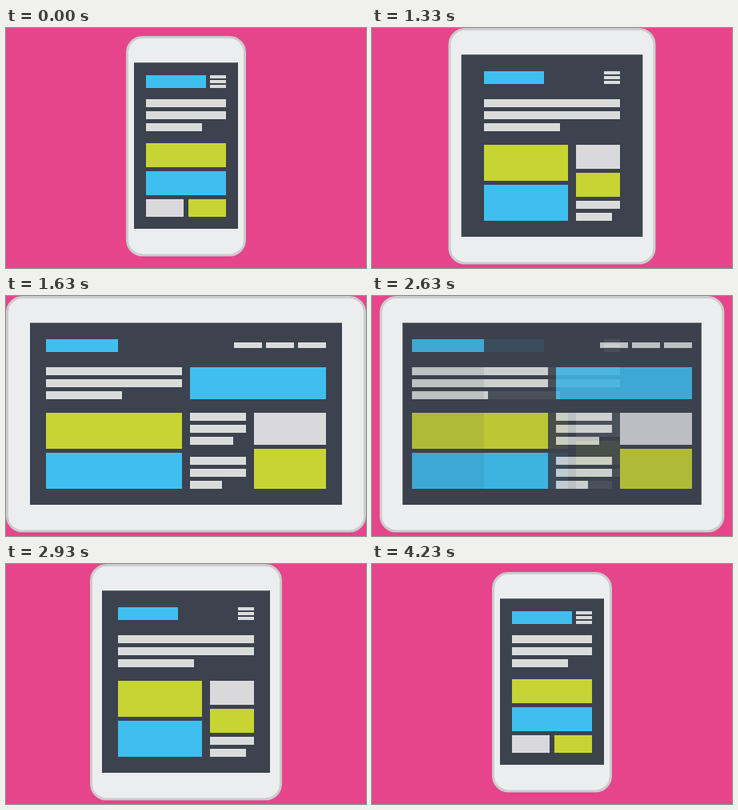
An HTML page for the animation above (5230 ms loop, 450x300 px).

```html
<!DOCTYPE html>
<html lang="en">
<head>
<meta charset="utf-8">
<title>Responsive layout</title>
<style>
  html, body { margin: 0; width: 100%; height: 100%; overflow: hidden; background: #e6458b; }
  svg { display: block; width: 100%; height: 100%; }
</style>
</head>
<body>
<svg id="stage" viewBox="0 0 450 300">
  <defs><clipPath id="glass"><rect id="clip"/></clipPath></defs>
  <rect width="450" height="300" fill="#e6458b"/>
  <rect id="shadow" height="1" fill="#cf3f7d"/>
  <rect id="body" rx="19" fill="#ebedee" stroke="#cacccd" stroke-width="3"/>
  <rect id="screen" fill="#3c434e"/>
  <g id="pages" clip-path="url(#glass)"></g>
</svg>
<script>
const NS = 'http://www.w3.org/2000/svg';
const $ = id => document.getElementById(id);
const BLUE = '#3fbff0', LIME = '#c8d433', GREY = '#d9d9dc', LINE = '#d9dcda', DARK = '#3c434e';
const STEPS = 11, STEP_MS = 30, LOOP = 5230;

function setBox(el, x, y, w, h) {
  Object.entries({ x, y, width: w, height: h }).forEach(([k, v]) => el.setAttribute(k, v));
}

function page(draw) {
  const g = document.createElementNS(NS, 'g');
  const box = (fill, x, y, w, h) => {
    const r = document.createElementNS(NS, 'rect');
    setBox(r, x, y, w, h);
    r.setAttribute('fill', fill);
    g.append(r);
  };
  const lines = (x, y, ...widths) => widths.forEach((w, i) => box(LINE, x, y + i * 15, w, 10));
  const menu = (x, y) => [0, 6, 12].forEach(d => box(LINE, x, y + d, 20, 4));
  draw(box, lines, menu);
  return g;
}

const desktop = page((box, lines) => {
  box(BLUE, 50, 54, 90, 16);
  [285, 325, 365].forEach(x => box(LINE, x, 58, 35, 7));
  lines(50, 89, 170, 170, 95);
  box(BLUE, 230, 89, 170, 40);
  box(LIME, 50, 146, 170, 45);
  box(BLUE, 50, 196, 170, 45);
  lines(230, 146, 70, 70, 54);
  lines(230, 201, 70, 70, 40);
  box(GREY, 310, 146, 90, 40);
  box(LIME, 310, 191, 90, 50);
});

const tablet = page((box, lines, menu) => {
  box(DARK, 0, 0, 450, 300);
  box(BLUE, 140, 54, 75, 16);
  menu(290, 54);
  lines(140, 89, 170, 170, 95);
  box(LIME, 140, 146, 105, 45);
  box(BLUE, 140, 196, 105, 45);
  box(GREY, 255, 146, 55, 30);
  box(LIME, 255, 181, 55, 30);
  lines(255, 216, 55, 45);
});

const phone = page((box, lines, menu) => {
  box(DARK, 0, 0, 450, 300);
  box(BLUE, 175, 59, 75, 16);
  menu(255, 59);
  lines(175, 89, 100, 100, 70);
  box(LIME, 175, 144, 100, 30);
  box(BLUE, 175, 179, 100, 30);
  box(GREY, 175, 214, 47, 22);
  box(LIME, 228, 214, 47, 22);
});

const pages = [phone, tablet, desktop];
$('pages').append(desktop, tablet, phone);

// Body and screen as [x, y, width, height]
const devices = [
  { body: [150, 10, 150, 275.5], screen: [160, 43.5, 130, 207.5] },
  { body: [105, 0, 240, 295.5], screen: [120, 33.5, 210, 227.5] },
  { body: [0, 0, 450, 295.5], screen: [30, 33.5, 390, 227.5] }
];

const moves = [
  { at: 30, from: 0, to: 1 },
  { at: 1330, from: 1, to: 2 },
  { at: 2630, from: 2, to: 1 },
  { at: 3930, from: 1, to: 0 }
];

const mix = (a, b, p) => a.map((v, i) => v + (b[i] - v) * p);

function render(time) {
  const t = time % LOOP;
  const move = moves.findLast(m => t >= m.at) || moves[0];
  const { at, from, to } = move;
  const step = Math.max(0, Math.min(STEPS, Math.floor((t - at) / STEP_MS) + 1));
  const p = step / STEPS;
  // Content starts to fade one step late when the device grows
  const fade = to > from ? Math.max(0, step - 1) / (STEPS - 1) : p;

  const [x, y, w, h] = mix(devices[from].body, devices[to].body, p);
  setBox($('body'), x + 1.5, y + 1.5, w - 3, h - 3);
  setBox($('shadow'), x + 18, y + h, w - 36, 1);
  const glass = mix(devices[from].screen, devices[to].screen, p);
  setBox($('screen'), ...glass);
  setBox($('clip'), ...glass);
  pages.forEach((g, i) =>
    g.setAttribute('opacity', i === from ? 1 - fade : i === to ? fade : 0));
}

let start;
function tick(now) {
  start ??= now;
  render(now - start);
  requestAnimationFrame(tick);
}
render(0);
requestAnimationFrame(tick);
</script>
</body>
</html>
```
